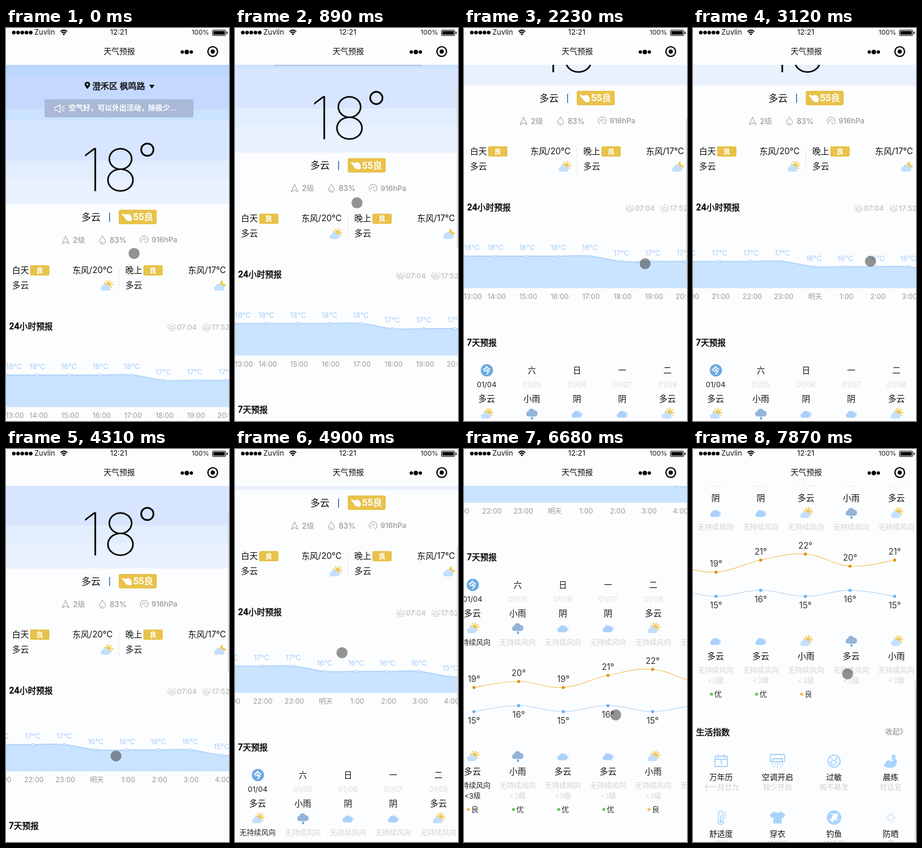
Animation, 370 px wide and 651 px high, one loop 8 s. Source, as an HTML page:

```html
<!DOCTYPE html>
<html lang="zh-CN">
<head>
<meta charset="utf-8">
<title>天气预报</title>
<style>
html, body { margin: 0; width: 100%; height: 100%; overflow: hidden; background: #fcfdfe; }
svg { display: block; width: 100%; height: 100%; font-family: Inter, "Noto Sans CJK SC", "Noto Sans CJK", sans-serif; }
</style>
</head>
<body>
<svg id="stage" viewBox="0 0 370 651"></svg>
<script>
const STEP = 148.5, LOOP = 8000;
const stage = document.getElementById('stage');

// ---- drawing helpers ----
const text = (x, y, str, size, fill = '#111', attrs = '') =>
  `<text x="${x}" y="${y + size * 0.36}" font-size="${size}" fill="${fill}" ${attrs}>${str}</text>`;
const mid = (x, y, str, size, fill, attrs = '') => text(x, y, str, size, fill, 'text-anchor="middle" ' + attrs);
const end = (x, y, str, size, fill, attrs = '') => text(x, y, str, size, fill, 'text-anchor="end" ' + attrs);
const rect = (x, y, w, h, fill, r = 0) => `<rect x="${x}" y="${y}" width="${w}" height="${h}" rx="${r}" fill="${fill}"/>`;
const dot = (x, y, r, fill, attrs = '') => `<circle cx="${x}" cy="${y}" r="${r}" fill="${fill}" ${attrs}/>`;
const fillPath = (d, fill) => `<path d="${d}" fill="${fill}"/>`;
const line = (d, color, w = 1) =>
  `<path d="${d}" fill="none" stroke="${color}" stroke-width="${w}" stroke-linecap="round" stroke-linejoin="round"/>`;
const at = (x, y, body) => `<g transform="translate(${x} ${y})">${body}</g>`;
const BOLD = 'font-weight="700"', MEDIUM = 'font-weight="500"', LIGHT = 'font-weight="300"';
// The CJK face lacks a middle weight, so a hairline outline thickens it.
const semi = color => `${MEDIUM} stroke="${color}" stroke-width=".45"`;

function rays(cx, cy, r1, r2, n, color, w) {
  let d = '';
  for (let i = 0; i < n; i++) {
    const a = i * 2 * Math.PI / n, c = Math.cos(a), s = Math.sin(a);
    d += `M${cx + r1 * c} ${cy + r1 * s}L${cx + r2 * c} ${cy + r2 * s}`;
  }
  return line(d, color, w);
}

function curve(points) {
  const p = i => points[Math.max(0, Math.min(points.length - 1, i))];
  let d = `M${points[0]}`;
  for (let i = 0; i < points.length - 1; i++) {
    const [a, b, c, e] = [p(i - 1), p(i), p(i + 1), p(i + 2)];
    d += `C${b[0] + (c[0] - a[0]) * 0.2} ${b[1] + (c[1] - a[1]) * 0.2} ` +
      `${c[0] - (e[0] - b[0]) * 0.2} ${c[1] - (e[1] - b[1]) * 0.2} ${c}`;
  }
  return d;
}

// ---- icons, centred on 0,0 ----
const CLOUD = 'M-6 8a4.6 4.6 0 0 1-.6-9.1A6 6 0 0 1 4.5-2.6A5.4 5.4 0 0 1 5.6 8Z';
const cloud = (x, y, scale, fill) =>
  `<path transform="translate(${x} ${y}) scale(${scale})" d="${CLOUD}" fill="${fill}"/>`;
const SKY = {
  sun: rays(3, -2, 5.6, 7.2, 9, '#f2c64d', 1.8) + dot(3, -2, 4.2, '#f2c64d') + cloud(-1.5, 1.5, 0.82, '#c3dffc'),
  moon: fillPath('M5-9a5.2 5.2 0 1 0 5.5 6.5A4.5 4.5 0 0 1 5-9Z', '#f2c64d') + cloud(-.8, 1.2, 0.86, '#c3dffc'),
  cloud: cloud(2.4, -1, 0.72, '#d4e8fd') + cloud(-1, 0, 0.82, '#a9d0fa'),
  rain: cloud(0, -3, 0.95, '#94b4da') + fillPath('M0 4.5C3 8 1.8 9.5 0 9.5S-3 8 0 4.5Z', '#62a3e8')
};
const BLUE = '#a9d3fd';
const LIFE = {
  calendar: line('M-10-8H10.5V9H-10ZM-10-3H10.5M-5-10.5V-6M5.5-10.5V-6', BLUE, 1.8) + mid(0, 3.4, '1', 10, BLUE, BOLD),
  cooler: line('M-9.5-11H9.5Q12-11 12-8.5V-1Q12 1 10 1H-10Q-12 1-12-1V-8.5Q-12-11-9.5-11ZM-8 0V-4H8V0', BLUE, 1.8) +
    line('M-4 4L-7 11M0 4V12M4 4L7 11M-8 4L-10 6M8 4L10 6', BLUE, 1.5).replace('<path', '<path stroke-dasharray="2 2.6"'),
  allergy: `<circle r="10" fill="none" stroke="${BLUE}" stroke-width="2"/>` +
    dot(-1, 2.5, 4, 'none', `stroke="${BLUE}" stroke-width="2"`) + dot(4, -4, 2, BLUE) + dot(-4, -4, 1.2, BLUE) + dot(6, 3, 1, BLUE),
  arm: fillPath('M3-11L8-10Q9-7 7-5L5-5Q12-3 10 5Q8 11-2 11Q-8 11-11 8Q-9 3-7 0Q-3-3 0 0Q3 1 4-1Q0-4 3-11Z', BLUE),
  thermo: line('M-4 3V-8A3.5 3.5 0 0 1 3 -8V3A5 5 0 1 1-4 3ZM-.5 6V-3M6-8H8M6-4H8M6 0H8', BLUE, 1.7) + dot(-.5, 7, 2.2, BLUE),
  shirt: fillPath('M-5-10Q0-6 5-10L13-5L10 1L7-.5V10H-7V-.5L-10 1L-13-5Z', BLUE),
  fish: dot(0, 0, 12, BLUE) + fillPath('M6-7Q7 2-1 5L-3 9L-5 5L-8 3L-4 1Q-4-6 6-7ZM-3-4L-6-6L0-7ZM5 1L6 5L2 4Z', '#fff'),
  shade: dot(0, 0, 5, 'none', `stroke="${BLUE}" stroke-width="1"`) + rays(0, 0, 7.5, 8.4, 8, BLUE, 1)
};
const sunrise = line('M-7 3H7M-4 6H4M-4 3A4 4 0 0 1 4 3M0-6V-4M-5.5-4L-4-2.5M5.5-4L4-2.5M-7.5 0H-6M6 0H7.5', '#c3c3c3', 1.1);

// ---- page parts ----
function banner() {
  const bands = [[61, '#bcd6fe'], [79, '#c5d9fe'], [135, '#cbe2fe'], [153, '#d8e5fe'], [220, '#e2eefe'], [250, '#eaf1fe'], [292]];
  let out = rect(0, -40, 370, 101, '#bcd6fe');
  for (let i = 0; i < 6; i++) out += rect(0, bands[i][0], 370, bands[i + 1][0] - bands[i][0], bands[i][1]);
  out += fillPath('M135 101Q130.5 96 130.5 93.5A4.5 4.5 0 0 1 139.5 93.5Q139.5 96 135 101Z', '#111') + dot(135, 93.4, 1.6, '#c5d9fe');
  out += text(143, 96, '澄禾区 枫鸣路', 14, '#111', semi('#111')) + fillPath('M237.5 94H246.5L242 100.5Z', '#111');
  out += rect(64, 118, 247, 30, '#a9b9d6', 3);
  out += line('M81 130.5H84.5L90 127V140L84.5 136.5H81ZM93 131L96.5 129M93 133.5H97M93 136L96.5 138', '#fff', 1.2);
  out += text(104, 133, '空气好，可以外出活动，除极少...', 12, '#fff', BOLD);
  const thin = 'font-weight="100" stroke="#000" stroke-width=".4"';
  out += `<text x="160" y="270" font-size="97" text-anchor="end" ${thin}>1</text>`;
  out += `<text x="190" y="270" font-size="97" text-anchor="middle" ${thin}>8</text>`;
  return out + dot(234.5, 201.5, 10.2, 'none', 'stroke="#000" stroke-width="2.8"');
}

function current() {
  const gray = '#999';
  let out = text(125, 313, '多云', 16) + rect(171, 306, 1.6, 15, '#3a77b4');
  out += rect(187, 301, 63, 24, '#e8c24a', 3);
  out += fillPath('M192 309Q194.5 306.500 197.500 309.500Q205 305 208.500 313Q209 317.500 208 319.500Q199 321 196.500 313.500Q195 312 192 309Z', '#fff');
  out += text(211, 313, '55良', 15, '#fff', semi('#fff'));
  out += line('M99 345L104.500 357L99 354L93.500 357Z', gray) + text(111, 351, '2级', 12.5, gray, MEDIUM);
  out += line('M160 345Q155 351 155 353A5 4.600 0 0 0 165 353Q165 351 160 345ZM158 353.500Q158.500 355.500 160 355.500', gray) + text(172, 351, '83%', 12.5, gray, MEDIUM);
  out += line('M225 356A6.500 6.500 0 1 1 233.500 356M226 352A3.500 3.500 0 0 1 232 350M229.500 353L232 356', gray) + text(241.5, 351, '916hPa', 12.3, gray, MEDIUM);
  out += rect(187, 395, 1, 41, '#ececec');
  [[10, 177, '白天', '20', 'sun'], [198, 365, '晚上', '17', 'moon']].forEach(([x, right, name, temp, sky]) => {
    out += text(x, 401, name, 14) + rect(x + 30, 393, 32, 17, '#e8c24a', 2) + mid(x + 46, 401.5, '良', 11.5, '#fff', BOLD);
    out += end(right, 401, `东风/${temp}℃`, 14) + text(x, 426, '多云', 14);
    out += at(right - 10, 427, SKY[sky]);
  });
  out += text(5, 494, '24小时预报', 13.8, '#000', semi('#000'));
  [[275, '07:04'], [333, '17:52']].forEach(([x, time]) => {
    out += at(x, 495, sunrise) + text(x + 8.5, 496, time, 12, '#bebebe', MEDIUM);
  });
  return out;
}

function hours() {
  const temps = [18, 18, 18, 18, 18, 17, 17, 17, 17, 17, 17, 16, 16, 16, 16, 15, 15, 15];
  const pts = temps.map((t, i) => [i * 52.2, 575 + (18 - t) * 8.7]);
  const d = curve(pts);
  let out = fillPath(`${d}V628H0Z`, '#cae4ff') + line(d, '#b1d5fd', 2);
  pts.forEach(([x, y], i) => {
    const h = (13 + i) % 24;
    out += dot(x, y, 2, '#fff', 'stroke="#a9d1fc" stroke-width="1.2"');
    out += mid(i ? x : 13, y - 14, temps[i] + '℃', 12, '#a4cefb');
    out += mid(i ? x + 2 : 14.5, 642, h ? h + ':00' : '明天', 11.7, '#9a9a9a');
  });
  return out;
}

function week() {
  const names = [...'今六日一二三四'], skies = ['sun', 'rain', 'cloud', 'cloud', 'sun', 'rain', 'sun'];
  const label = { sun: '多云', rain: '小雨', cloud: '阴' };
  const night = ['多云', '小雨', '多云', '多云', '小雨', '多云', '小雨'];
  const air = [...'良优优优良'], pale = '#d2d2d2';
  let out = '';
  names.forEach((name, i) => {
    const x = 37.5 + 75 * i, tone = i ? pale : '#222', weight = i ? LIGHT : '';
    if (!i) out += dot(x + .5, 764, 10.3, '#6caae2');
    out += mid(x, 764, name, 13.5, i ? '#111' : '#fff', i ? '' : BOLD);
    out += mid(x, 788, '01/0' + (4 + i), 12.2, tone, weight);
    out += mid(x, 811, label[skies[i]], 14) + at(x + .5, 836, SKY[skies[i]]);
    out += mid(x, 860, '无持续风向', 12, tone, weight);
    out += at(x + .5, 1048, SKY[skies[i]]) + mid(x, 1073, night[i], 14);
    out += mid(x, 1097, '无持续风向', 12, tone, weight) + mid(x, 1114, '&lt;3级', 12, tone, weight);
    if (air[i]) out += dot(x - 7, 1136, 2.6, air[i] === '良' ? '#efc24c' : '#6cc463') + mid(x + 4, 1136, air[i], 12.5, '#333');
  });
  [[[19, 20, 19, 21, 22, 20, 21], 934, 19, '#f4c566', '#de9410', -14],
   [[15, 16, 15, 16, 15, 16, 15], 974, 15, '#aed5fc', '#6bb0f6', 15]].forEach(([temps, base, low, stroke, fill, dy]) => {
    const pts = temps.map((t, i) => [40 + 74.1 * i, base - (t - low) * 10]);
    out += line(curve(pts), stroke, 1.2);
    pts.forEach(([x, y], i) => { out += dot(x, y, 2.6, fill) + mid(x, y + dy, temps[i] + '°', 14, '#333'); });
  });
  return out;
}

function life() {
  const items = [
    ['calendar', '万年历', '十一月廿九'], ['cooler', '空调开启', '较少开启'], ['allergy', '过敏', '极不易发'], ['arm', '晨练', '较适宜'],
    ['thermo', '舒适度', '舒适'], ['shirt', '穿衣', '较舒适'], ['fish', '钓鱼', '较适宜'], ['shade', '防晒', '弱']];
  let out = text(5, 1199, '生活指数', 14, '#000', semi('#000')) + text(319, 1199, '收起》', 12, '#888');
  items.forEach(([icon, name, note], i) => {
    const x = 46.5 + 93.8 * (i % 4), y = 1247 + 93.5 * (i >> 2);
    out += at(x, y, LIFE[icon]) + mid(x, y + 26.5, name, 13) + mid(x, y + 44, note, 12, '#cfcfcf', LIGHT);
  });
  return out;
}

function header() {
  let out = rect(0, 0, 370, 61, '#fcfdfe');
  for (let i = 0; i < 5; i++) out += dot(13 + 7 * i, 7.5, 3.1, '#000');
  out += text(47, 7, 'Zuvlin', 12);
  out += line('M91 5.5Q96 1.500 101 5.500M93 8Q96 5.500 99 8', '#000', 1.8) + dot(96, 10.3, 1.5, '#000');
  out += mid(187, 7, '12:21', 12.3) + text(308, 7, '100%', 11);
  out += '<rect x="342.500" y="3.500" width="22" height="9" rx="1.500" fill="none" stroke="#000"/>' + rect(344, 5, 19, 6, '#000') + rect(366, 6, 1.5, 4, '#000');
  out += mid(188, 38, '天气预报', 13);
  out += dot(292.5, 39.7, 2.8, '#000') + dot(300, 39.7, 3.7, '#000') + dot(307.5, 39.7, 2.8, '#000');
  return out + dot(343, 39, 8, 'none', 'stroke="#000" stroke-width="2.2"') + dot(343, 39, 3.5, '#000');
}

stage.innerHTML = `<rect width="370" height="651" fill="#fcfdfe"/>
  <g id="page">${banner()}${current()}<g id="hours">${hours()}</g>
  ${text(5, 718, '7天预报', 13.8, '#000', semi('#000'))}
  <g id="week">${week()}</g>${life()}</g>
  <rect id="bar" x="368.500" width="1.500" height="264" fill="#d8d8d8"/>
  ${header()}
  <g id="touch">${dot(.5, .5, 9.3, '#303030', 'fill-opacity=".520"')}${dot(.5, .5, 9.7, 'none', 'stroke="#fff" stroke-opacity=".4"')}</g>`;

// ---- motion: keys are [step, value...] ----
const scrollKeys = [[0, 0], [1, 8], [3, 8], [7, 100], [10, 129], [14, 197], [27, 197], [29, 94], [30, 100],
  [33, 224], [36, 330], [39, 498], [43, 539], [51, 539], [53, 730]];
const hourKeys = [[15, 0], [18, 300], [20, 366], [21, 373.6], [27, 425.6]];
const weekKeys = [[43, 0], [51, 150]];
const touchKeys = [[0, 212, 373], [1, 212, 365], [3, 212, 365], [7, 200, 275], [10, 183, 384], [14, 180, 316], [15, 300, 390],
  [18, 120, 390], [20, 310, 390], [21, 294, 386], [25, 243, 386], [26, 235, 209], [27, 205, 405], [29, 182, 508],
  [30, 181, 480], [33, 177, 337], [36, 170, 430], [39, 160, 295], [42, 165, 270], [43, 290, 440], [49, 140, 440], [51, 250, 520], [53, 256, 372]];

function sample(keys, k, n = 1) {
  const j = keys.findIndex(key => key[0] >= k);
  if (j < 0) return keys[keys.length - 1][n];
  if (j === 0) return keys[0][n];
  const a = keys[j - 1], b = keys[j], u = (k - a[0]) / (b[0] - a[0]);
  return a[n] + (b[n] - a[n]) * u * u * (3 - 2 * u);
}

const el = id => document.getElementById(id);
const parts = { page: el('page'), hours: el('hours'), week: el('week'), bar: el('bar'), touch: el('touch') };
const move = (part, x, y) => part.setAttribute('transform', `translate(${x} ${y})`);

function draw(ms) {
  const k = Math.floor((ms + 6) / STEP);
  const scroll = sample(scrollKeys, k);
  move(parts.page, 0, -scroll);
  move(parts.hours, -sample(hourKeys, k), 0);
  move(parts.week, -sample(weekKeys, k), 0);
  move(parts.touch, sample(touchKeys, k), sample(touchKeys, k, 2));
  parts.bar.setAttribute('y', 63.4 + scroll * 0.439);
  parts.bar.setAttribute('opacity', scroll === sample(scrollKeys, Math.max(0, k - 2)) ? 0 : 1);
}

const start = performance.now();
function tick() {
  draw((performance.now() - start) % LOOP);
  requestAnimationFrame(tick);
}
draw(0);
requestAnimationFrame(tick);
</script>
</body>
</html>
```
